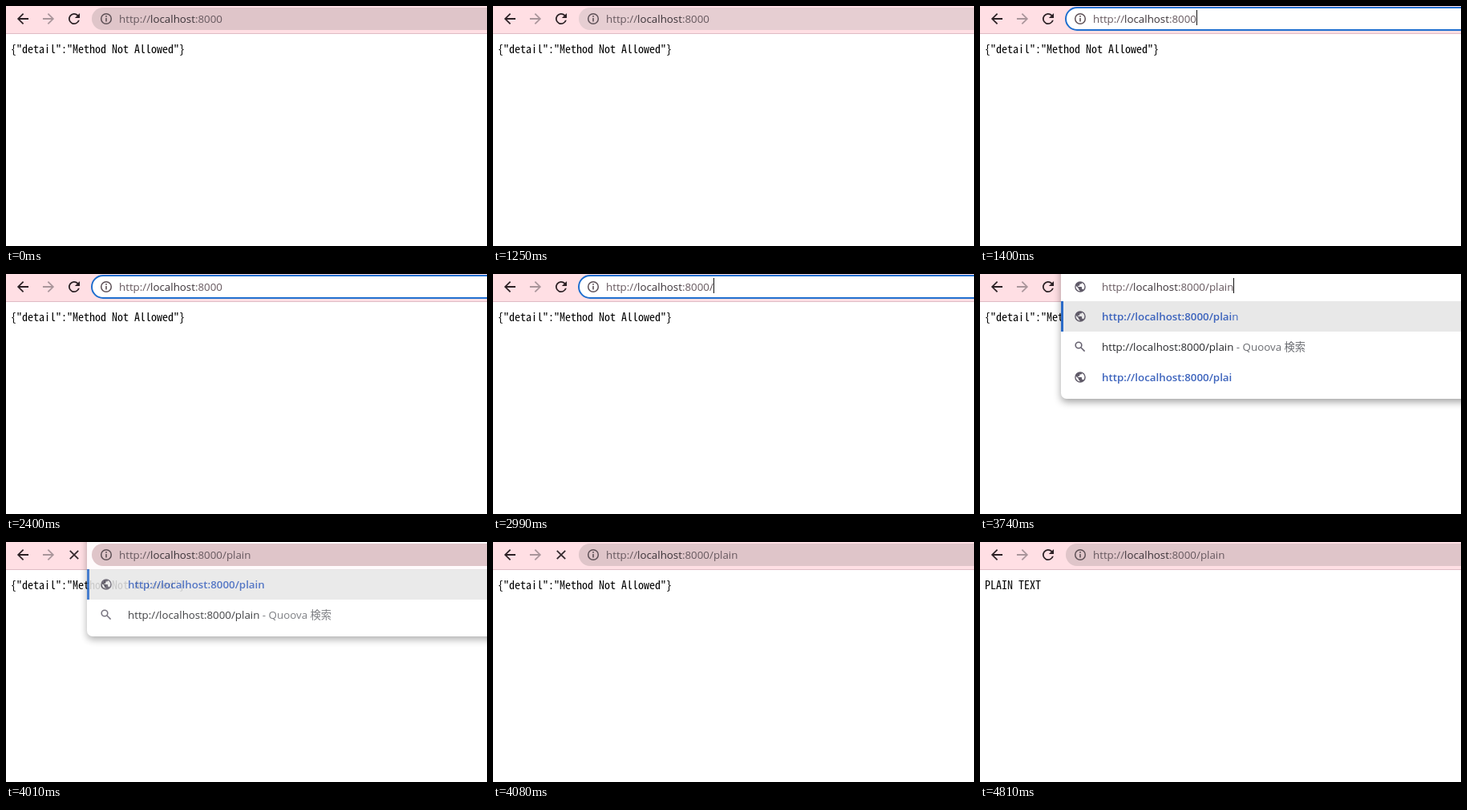
Write an HTML page that moves like this. It is 600 by 300 pixels and loops after 6350 ms.

```html
<!DOCTYPE html>
<html lang="en">
<head>
<meta charset="utf-8">
<title>Address bar</title>
<style>
  html, body { margin: 0; width: 100%; height: 100%; overflow: hidden; background: #fff; }
  svg { display: block; }
  text { font: 13.33px "Open Sans", "Noto Sans CJK JP", sans-serif; fill: #27282b; }
  .page { font: 14px "Noto Sans Mono CJK JP", "Noto Sans Mono", monospace; fill: #000; }
  .dim { fill: #6b6d72; }
  .url { fill: #66585e; }
  .url .host { fill: #3b3338; }
  .selected, .selected .host { fill: #fff; }
  .link { fill: #3d64bd; }
  .bold { font-weight: 600; }
  .panel { filter: drop-shadow(0 4px 5px rgba(0, 0, 0, .36)); }
</style>
</head>
<body>
<svg id="stage" width="600" height="300" viewBox="0 0 600 300"></svg>
<script>
const LOOP = 6350;
const BASE = 'http://localhost:8000';
const stage = document.getElementById('stage');

// Each step changes only the listed properties of the state.
const steps = [
  [0, { path: '', bar: 'idle', fill: '#dfc5c9', caret: false, selected: false, rows: 0, fade: 1, loading: false, done: false }],
  [1250, { fill: '#e6ced2' }],
  [1330, { fill: '#ecd6da' }],
  [1400, { bar: 'focus', caret: true }],
  [1470, { selected: true, caret: false }],
  [1870, { selected: false, caret: true }],
  [2400, { caret: false }],
  [2990, { path: '/', caret: true }],
  [3070, { bar: 'open', rows: 5 }],
  [3270, { path: '/p' }],
  [3400, { path: '/pl', rows: 3 }],
  [3540, { path: '/pla' }],
  [3610, { path: '/plai' }],
  [3740, { path: '/plain' }],
  [3810, { rows: 2 }],
  [4010, { bar: 'idle', fill: '#dfc5c9', caret: false, fade: .87, loading: true }],
  [4080, { rows: 0 }],
  [4810, { loading: false, done: true }]
];

const paths = {
  back: 'M20 11H7.83l5.59-5.59L12 4l-8 8 8 8 1.41-1.41L7.83 13H20z',
  reload: 'M17.65 6.35A8 8 0 1 0 19.73 14h-2.08A6 6 0 1 1 16.22 7.78L13 11h7V4z',
  globe: 'M12 2a10 10 0 1 0 0 20 10 10 0 1 0 0-20zm-1 17.93A8 8 0 0 1 4.21 10.21L9 15v1a2 2 0 0 0 2 2zm6.9-2.54A2 2 0 0 0 16 16h-1v-3a1 1 0 0 0-1-1H8v-2h2a1 1 0 0 0 1-1V7h2a2 2 0 0 0 2-2v-.41a8 8 0 0 1 2.9 12.8z'
};
const icon = (name, x, y, sx, sy, color) =>
  `<path d="${paths[name]}" fill="${color}" transform="translate(${x} ${y}) scale(${sx} ${sy}) translate(-12 -12)"/>`;
const globe = y => icon('globe', 125, y, .68, .68, '#5f5a68');
const lens = y => `<g fill="none" stroke="#66616f" stroke-width="1.6">
  <circle cx="123" cy="${y - 2}" r="3.8"/><path d="M126 ${y + 1}l4.6 4.6"/></g>`;
const dot = y => `<circle cx="125" cy="${y}" r="7" fill="#111"/>`;
const info = `<circle cx="125" cy="16" r="6.3" fill="none" stroke="#5d5056" stroke-width="1.5"/>
  <path d="M125 15v4.4M125 12v1.7" stroke="#5d5056" stroke-width="1.6"/>`;
const span = (cls, text) => `<tspan class="${cls}">${text}</tspan>`;

// Typed part in bold, the completed rest in regular weight.
const link = (typed, rest = '') => span('link bold', BASE + typed) + span('link', rest);

function panel({ path, rows, fade }) {
  const titled = (title, page) => title + span('dim', ' - ') + link('/', page);
  const last = path === '/plain' && rows === 3;
  const list = [
    [globe, last ? link('/plai', 'n') : link(path)],
    [lens, BASE + path + span('dim', ' - Quoova 検索')],
    ...(rows === 5 ? [
      [dot, titled('BrivAPI - Tornell UI', 'docs')],
      [globe, titled('BrivAPI', 'html')]
    ] : []),
    ...(rows > 2 ? [[globe, last ? link('/plai') : link(path, '/plain'.slice(path.length))]] : [])
  ];
  return `<g opacity="${fade}">
    <rect class="panel" x="101" y="-20" width="540" height="${62 + rows * 38}" rx="7" fill="#fff"/>
    <path d="M101 34h499v38H101z" fill="#e8e8e8"/><path d="M101 34h3v38h-3z" fill="#2b6bc8"/>
    ${list.map(([mark, text], i) => mark(53 + i * 38) + `<text x="152" y="${58 + i * 38}">${text}</text>`).join('')}
  </g>`;
}

function draw(s) {
  const open = s.bar === 'open';
  const focus = s.bar === 'focus';
  const x = open ? 152 : 141;
  stage.innerHTML = `
    <path d="M0 0h600v34H0z" fill="#ffdfe4"/><path d="M0 34h600v1H0z" fill="#dfbcc5"/>
    ${icon('back', 21, 16, .88, .88, '#2b2024')}
    ${icon('back', 53, 16, -.88, .88, '#a9959a')}
    ${s.loading
      ? '<path d="M79.8 10.8l10.4 10.4m0-10.4L79.8 21.2" stroke="#33282c" stroke-width="1.8"/>'
      : icon('reload', 85, 16, .88, .88, '#2b2024')}
    <text class="page" x="6" y="59">${s.done ? 'PLAIN TEXT' : '{"detail":"Method Not Allowed"}'}</text>
    ${s.rows ? panel(s) : ''}
    ${open ? globe(16) : `<rect x="107" y="2" width="520" height="28" rx="14"
      fill="${focus ? '#fff' : s.fill}" ${focus ? 'stroke="#1f6fcf" stroke-width="2"' : ''}/>${info}`}
    <rect id="mark" x="${x}" y="5" height="${s.selected ? 22 : 19}" fill="${s.selected ? '#1a73d8' : '#111'}"/>
    <text id="url" class="url ${s.selected ? 'selected' : ''}" x="${x}" y="21">http://${span('host', 'localhost')}:8000${s.path}</text>`;

  // The selection and the caret both follow the text's own length.
  const mark = document.getElementById('mark');
  const length = document.getElementById('url').getComputedTextLength();
  if (s.caret) mark.setAttribute('x', Math.round(x + length));
  mark.setAttribute('width', s.selected ? length : s.caret ? 1 : 0);
}

let shown = -1;
function frame(now) {
  const t = now % LOOP;
  const count = steps.filter(([start]) => start <= t).length;
  if (count !== shown) {
    shown = count;
    draw(Object.assign({}, ...steps.slice(0, count).map(([, change]) => change)));
  }
  requestAnimationFrame(frame);
}
const begin = performance.now();
(function tick() {
  frameAt(performance.now() - begin);
  requestAnimationFrame(tick);
})();

function frameAt(time) {
  const t = time % LOOP;
  const count = steps.filter(([start]) => start <= t).length;
  if (count === shown) return;
  shown = count;
  draw(Object.assign({}, ...steps.slice(0, count).map(([, change]) => change)));
}
</script>
</body>
</html>
```
